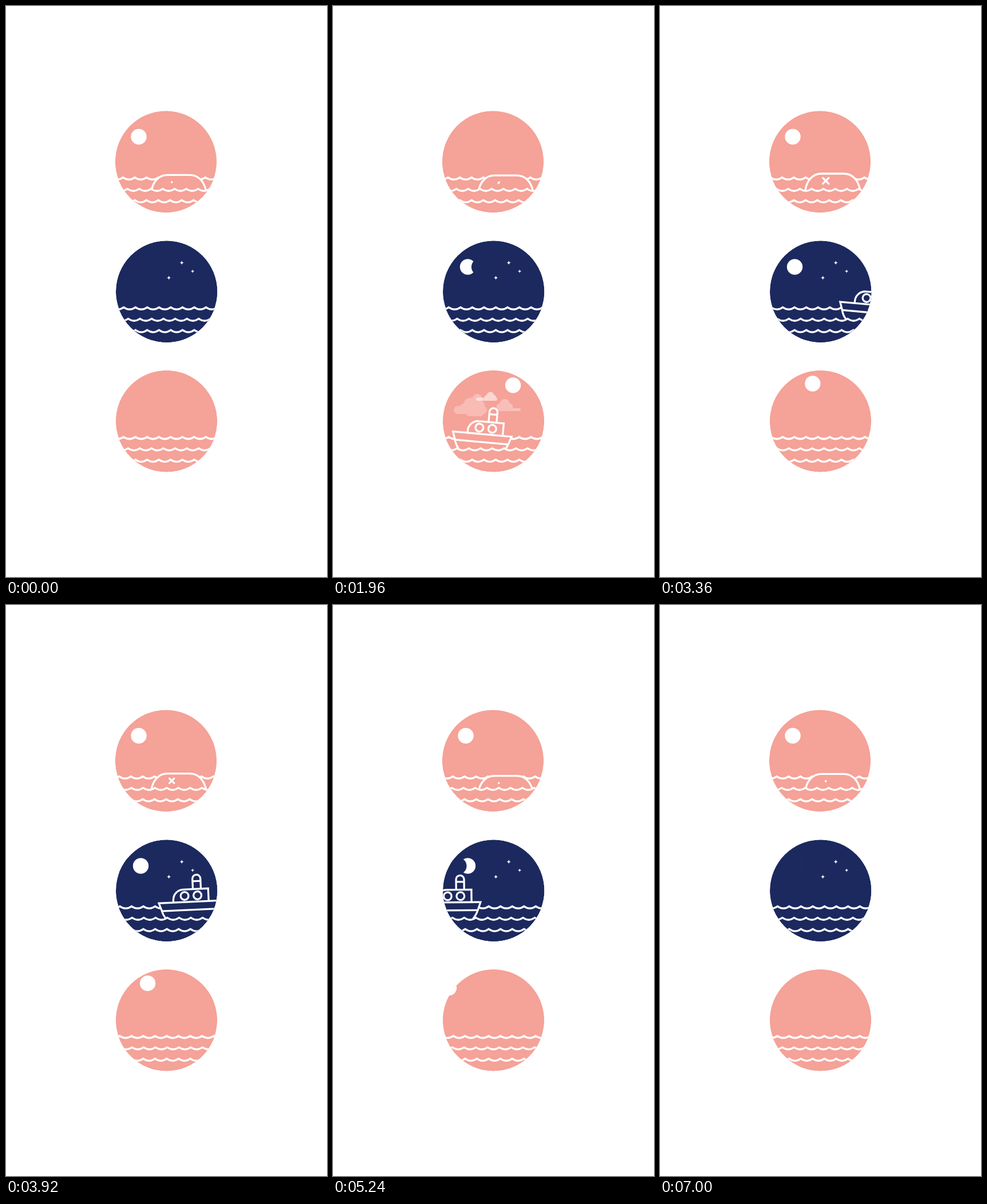
Write an HTML page that moves like this. It is 561 px wide and 998 px high and loops after 7.04 s.

```html
<!DOCTYPE html>
<html lang="en">
<head>
<meta charset="utf-8">
<title>Three seas</title>
<style>
  html, body { margin: 0; width: 100%; height: 100%; overflow: hidden; background: #fff; }
  svg { display: block; width: 561px; height: 998px; }
  .line { stroke: #fff; stroke-width: 3.3; }
</style>
</head>
<body>
<svg id="stage" viewBox="0 0 561 998"></svg>
<script>
const LOOP = 7040, STEP = 40;
const PINK = '#f5a298', NAVY = '#1c295f';
const RADIUS = 88.7, WAVE = 20.55, ORB = 13.7;
const stage = document.getElementById('stage');

function add(parent, tag, attrs = {}) {
  const node = document.createElementNS('http://www.w3.org/2000/svg', tag);
  for (const key in attrs) node.setAttribute(key, attrs[key]);
  parent.appendChild(node);
  return node;
}
const set = (node, key, value) => node.setAttribute(key, value);
const disc = (parent, cx, cy, r, fill = '#fff') => add(parent, 'circle', { cx, cy, r, fill });

// Smooth 0 to 1 between two times.
function ramp(t, from, to) {
  const u = Math.min(1, Math.max(0, (t - from) / (to - from)));
  return u * u * (3 - 2 * u);
}

const waves = [];

// A round window: sky, far wave, passing things, then two near waves.
function porthole(id, cx, cy, color) {
  const clip = add(stage, 'clipPath', { id });
  add(clip, 'circle', { cx, cy, r: RADIUS });
  const root = add(stage, 'g', { 'clip-path': `url(#${id})` });
  disc(root, cx, cy, RADIUS, color);
  const sky = add(root, 'g');
  const row = n => {
    const crest = `q${WAVE / 2} 7.4 ${WAVE} 0`;
    const d = `M${cx - 158.4 + n * WAVE / 2} ${cy + 27.6 + n * 19.9}${crest.repeat(15)}v70h-309z`;
    const node = add(root, 'path', { d, class: 'line', fill: color });
    waves.push({ node, dir: n === 1 ? -1 : 1 });
  };
  row(0);
  const sea = add(root, 'g');
  row(1);
  row(2);
  return { sky, sea, cy, color };
}

const day = porthole('day', 279.5, 272, PINK);
const night = porthole('night', 280.7, 499, NAVY);
const dusk = porthole('dusk', 280.5, 725.5, PINK);

// Whale
const daySun = disc(day.sky, 232, 228.5, ORB);
const whale = add(day.sea, 'g');
add(whale, 'path', {
  d: 'M251 40L254.3 27C257 12 267 0 282 0H321C337 0 346 12 349.5 27L353 40',
  class: 'line', fill: PINK
});
const eye = [-1, 1].map(() => add(whale, 'path', { class: 'line', 'stroke-linecap': 'round' }));

// Moon and stars
const MOON_X = 235.5;
disc(night.sky, MOON_X, 456, ORB);
const shade = disc(night.sky, MOON_X, 456, ORB + 0.9, NAVY);
function star(x, y, size) {
  let d = '';
  for (let i = 0; i < 8; i++) {
    const r = i % 2 ? size * 0.42 : size, a = i * Math.PI / 4;
    d += `${i ? 'L' : 'M'}${x + r * Math.cos(a)} ${y + r * Math.sin(a)}`;
  }
  add(night.sky, 'path', { d: d + 'z', fill: '#fff' });
}
star(307.2, 448.8, 3.5);
star(326.1, 463.6, 3.1);
star(284.6, 475, 3.5);

// Low sun and clouds
const duskSun = disc(dusk.sky, 0, 0, ORB);
const pill = (g, x, y, width, height) => add(g, 'rect', { x, y, width, height, rx: height / 2 });

// A flat base with one tall puff between two smaller ones.
function cloud(x, base, width, height, peak, r, opacity) {
  const g = add(dusk.sky, 'g', { fill: '#fff' });
  pill(g, x, base - height, width, height);
  disc(g, peak, base - 1.35 * r, r);
  for (const side of [-1, 1]) disc(g, peak + side * 0.9 * r, base - 0.8 * r, 0.7 * r);
  return { g, opacity };
}
const bank = cloud(206, 713, 58, 14, 235, 12, 0.4);
pill(bank.g, 228, 706, 30, 11);
disc(bank.g, 247, 686.5, 8.5);
disc(bank.g, 251, 698, 9);
const clouds = [
  bank,
  cloud(245, 690, 37, 5.5, 270, 6.6, 0.8),
  cloud(281, 708, 42, 5, 295, 9, 0.45)
];

// Boat, centred on its gunwale
function boat({ sea, color }) {
  const g = add(sea, 'g', { class: 'line', fill: color });
  add(g, 'path', { d: 'M9 -21V-40a7 7 0 0 1 14 0V-21M9 -35.8H23' });
  add(g, 'path', { d: 'M-26 0V-4A18 18 0 0 1 -8 -22H35.7V0' });
  for (const cx of [-6, 16.5]) add(g, 'circle', { cx, cy: -10.8, r: 6.9 });
  add(g, 'path', { d: 'M-39 29Q-45 22 -47 13L-51.5 0H51.5L47 13Q44 22 38 29' });
  add(g, 'path', { d: 'M-47 14H47' });
  return g;
}
const nightBoat = boat(night), duskBoat = boat(dusk);

function sail(g, port, x, tilt) {
  set(g, 'transform', `translate(${x} ${port.cy + 20.9}) rotate(${tilt} -20 0)`);
}

function draw(t) {
  const cycle = 2 * Math.PI * t / LOOP;

  // Neighbouring rows scroll in opposite directions.
  const scroll = (3 * t / LOOP + 0.06) % 1 * WAVE;
  waves.forEach(({ node, dir }) => set(node, 'transform', `translate(${dir * scroll} 0)`));

  const top = 296 + Math.cos(cycle) - Math.sin(cycle)
    - 1.7 * Math.cos(2 * cycle) + 0.9 * Math.sin(2 * cycle);
  set(whale, 'transform', `translate(0 ${top})`);
  eye.forEach((line, i) => {
    const begin = 1880 + 200 * i;
    const h = 0.05 + 5 * (ramp(t, begin, begin + 320) - ramp(t, 3800, 4240));
    const v = i ? h : -h;
    set(line, 'd', `M${289.7 - h} ${12.6 - v}L${289.7 + h} ${12.6 + v}`);
  });
  set(daySun, 'opacity', 1 - ramp(t, 1480, 1880) + ramp(t, 2920, 3320));

  // The shadow leaves to the right and returns from the left.
  const shift = t < LOOP / 2 ? 0.0107 * t : 0.0092 * (t - LOOP);
  set(shade, 'cx', MOON_X + shift);

  const sunX = 342 - 0.0342 * (t - 1160);
  set(duskSun, 'cx', sunX);
  set(duskSun, 'cy', 659.9 + 0.0018 * (sunX - 274) ** 2);

  const haze = ramp(t, 0, 900) - ramp(t, 1200, 3300);
  clouds.forEach(({ g, opacity }) => {
    set(g, 'opacity', opacity * haze);
    set(g, 'transform', `translate(${0.0063 * (t - 1160)} 0)`);
  });

  const tilt = 5.7 * Math.cos(5 * cycle - 2 * Math.PI * 0.457);
  sail(duskBoat, dusk, 329 - 0.085 * (t - 1160), tilt);
  sail(nightBoat, night, 271 - 0.085 * (t - 4480), tilt);
}

const start = performance.now();
function tick(now) {
  const t = Math.max(0, now - start) % LOOP;
  draw(Math.floor(t / STEP) * STEP);
  requestAnimationFrame(tick);
}
draw(0);
requestAnimationFrame(tick);
</script>
</body>
</html>
```
